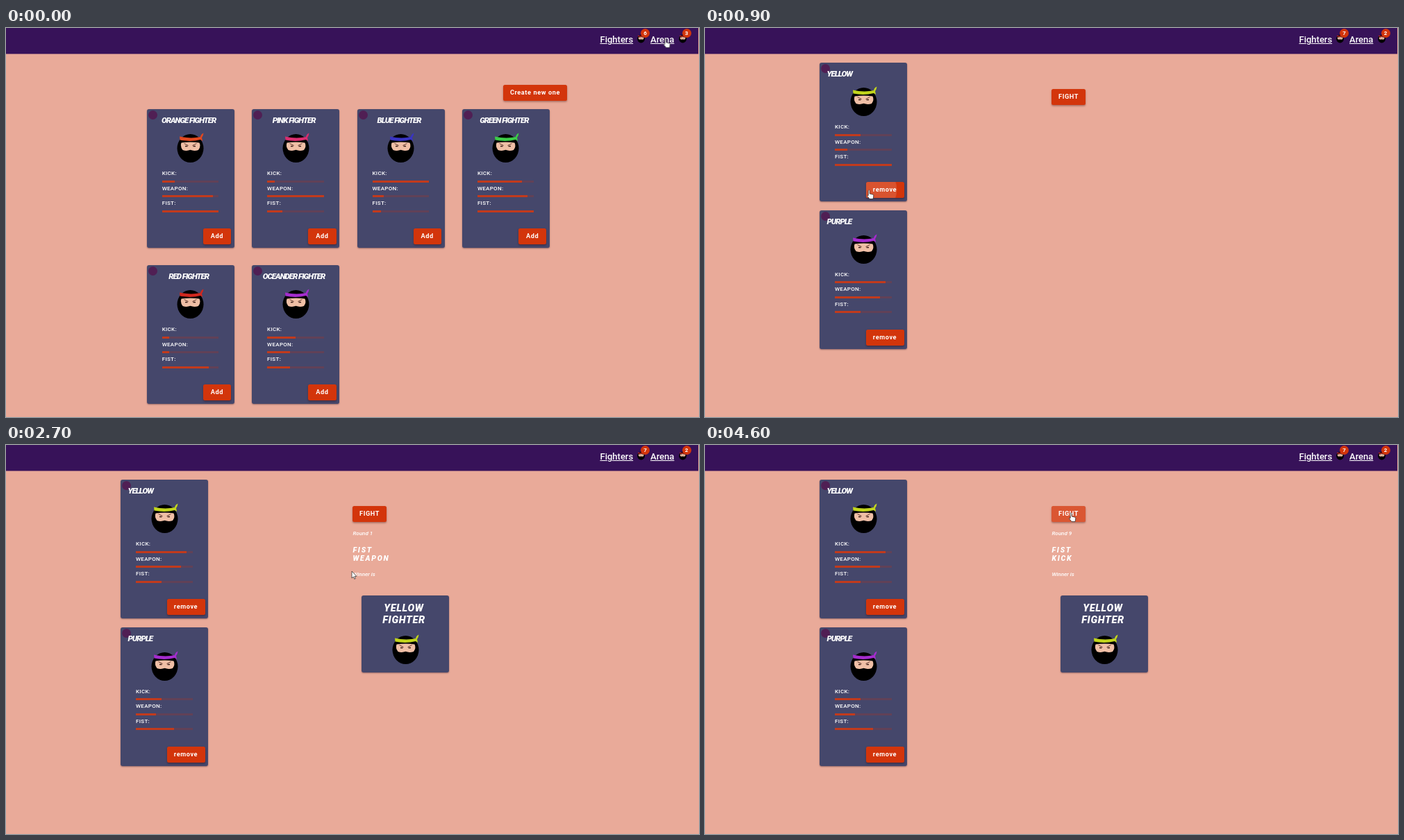
Write an HTML page that moves like this. It is 998 px wide and 561 px high and loops after 4700 ms.

```html
<!DOCTYPE html>
<html lang="en">
<head>
<meta charset="utf-8">
<title>Fighter arena</title>
<style>
html, body { margin: 0; width: 100%; height: 100%; overflow: hidden; background: #e9aa99; }
body { position: relative; font-family: Roboto, sans-serif; color: #fff; }
div, svg { position: absolute; white-space: nowrap; }
#stage { left: 0; top: 0; width: 998px; height: 561px; overflow: hidden; --loop: 4.7s infinite; }
.scene { inset: 0; }
.list { animation: list var(--loop) step-end; }
.trio { animation: trio var(--loop) step-end; }
.duel { animation: duel var(--loop) step-end; }

.top { left: 0; height: 37px; background: #371259; box-shadow: 0 1px 0 rgba(55, 18, 92, .4); }
.link { font: 500 13px/20px Roboto, sans-serif; top: 7px; text-decoration: underline; }
.badge { width: 13px; height: 13px; top: .5px; border-radius: 50%; background: #d3350b; font: 700 8px/13px Roboto, sans-serif; text-align: center; }

.card { width: 126px; height: 200px; border-radius: 3px; background: #45476b; box-shadow: 0 1px 2px rgba(40, 20, 40, .45); }
.dot { left: 2px; top: 2px; width: 13px; height: 13px; border-radius: 50%; background: #501f54; }
.title { top: 8px; left: 10.5px; font: italic 900 11.5px/16px Roboto, sans-serif; letter-spacing: -1px; }
.list .title { left: 0; width: 121px; text-align: center; }
.face { left: 43.6px; top: 33px; width: 42px; height: 46px; }
.label { left: 22px; font: 500 8px/12px Roboto, sans-serif; letter-spacing: .3px; }
.track { left: 22px; width: 81.5px; height: 3px; background: rgba(180, 50, 30, .25); }
.fill { height: 3px; background: #c23a1c; animation: grow var(--loop) ease; }
.btn { height: 23px; border-radius: 2.5px; background: #d3350b; box-shadow: 0 1.5px 2.5px rgba(60, 10, 10, .4); overflow: hidden; font: 700 9.2px/22.5px Roboto, sans-serif; letter-spacing: .58px; text-align: center; }
.glow { inset: 0; background: #fff; opacity: 0; animation: glow var(--loop) linear; }
.ripple { left: -30px; top: -26px; width: 74px; height: 74px; border-radius: 50%; background: #fff; opacity: 0; animation: ripple var(--loop) linear; }

.bar { right: 0; top: 0; width: 11px; height: 561px; background: #f1f1f1; }
.thumb { left: 2px; top: 8px; width: 7.5px; height: 506px; background: #c1c1c1; }
.arrow { left: 3.5px; border: solid transparent; border-width: 0 2.2px 2.5px; border-bottom-color: #777; }

.window { left: 490px; top: 115px; width: 160px; height: 230px; overflow: hidden; }
.reel { animation: reel var(--loop) step-end; }
.note { left: 9.5px; font: italic 500 8px/12px Roboto, sans-serif; }
.move { left: 9.5px; font: italic 900 10.5px/12px Roboto, sans-serif; letter-spacing: 1.75px; }
.winner { left: 22px; top: 102px; height: 111px; }
.winner .face { top: 55px; }
.name { left: 0; top: 10px; width: 122px; font: italic 900 14.5px/17px Roboto, sans-serif; letter-spacing: .65px; text-align: center; }

#cursor { left: 0; top: 0; animation: travel var(--loop) ease-in-out; }
#cursor svg { overflow: visible; width: 12px; height: 16px; }
.hand { left: -3px; top: 0; animation: hand var(--loop) step-end; }
.pointer { animation: pointer var(--loop) step-end; }

@keyframes list { 0% { visibility: visible } 2.1%, 100% { visibility: hidden } }
@keyframes trio { 0% { visibility: hidden } 2.1% { visibility: visible } 18.9%, 100% { visibility: hidden } }
@keyframes duel { 0% { visibility: hidden } 18.9%, 100% { visibility: visible } }
@keyframes grow { 0%, 19.2% { width: var(--from) } 24.5%, 100% { width: var(--to) } }
@keyframes ripple {
  0%, 17.5% { transform: scale(0); opacity: .15 }
  19.15% { transform: scale(1); opacity: .15 }
  21.3% { transform: scale(1.6); opacity: .14 }
  24.5%, 100% { transform: scale(1.6); opacity: 0 }
}
@keyframes glow {
  0%, 34% { opacity: 0 }
  35%, 43.8% { opacity: .04 }
  44.6%, 47% { opacity: .15 }
  50%, 65.5% { opacity: 0 }
  66.5% { opacity: .05 }
  68%, 100% { opacity: .16 }
}
@keyframes reel {
  0% { transform: none }
  44.4% { transform: translateY(-230px) }
  67.6% { transform: translateY(-460px) }
  71.9% { transform: translateY(-690px) }
  78.5% { transform: translateY(-920px) }
  82.7% { transform: translateY(-1150px) }
  87% { transform: translateY(-1380px) }
  91.2% { transform: translateY(-1610px) }
  93.4% { transform: translateY(-1840px) }
  95.5%, 100% { transform: translateY(-2070px) }
}
@keyframes travel {
  0% { transform: translate(950px, 14.5px); animation-timing-function: linear }
  4.25% { transform: translate(860px, 55px) }
  14.9% { transform: translate(240px, 236px) }
  19.1%, 24% { transform: translate(236px, 233px) }
  34.5%, 46.8% { transform: translate(514px, 95.5px) }
  53%, 61% { transform: translate(498px, 182px) }
  66.5%, 100% { transform: translate(527px, 97px) }
}
@keyframes hand {
  0% { visibility: visible } 2.1% { visibility: hidden }
  14% { visibility: visible } 25.5% { visibility: hidden }
  33.5% { visibility: visible } 48% { visibility: hidden }
  65.8%, 100% { visibility: visible }
}
@keyframes pointer {
  0% { visibility: hidden } 2.1% { visibility: visible }
  14% { visibility: hidden } 25.5% { visibility: visible }
  33.5% { visibility: hidden } 48% { visibility: visible }
  65.8%, 100% { visibility: hidden }
}
</style>
</head>
<body>
<svg width="0" height="0">
  <symbol id="ninja" viewBox="0 0 42 46">
    <ellipse cx="19.5" cy="23.5" rx="19" ry="20.5"/>
    <path d="M6.5 15.5Q19.5 13.5 32.500 15.500Q35 21 31 26Q25 28 19.500 25.800Q14 28 8.500 26Q4.500 21 6.500 15.500Z" fill="#f0bfa6"/>
    <path d="M10.500 16.500L16.500 19.500M28.500 16.500L22.500 19.500" stroke="#5a3026" stroke-width=".9"/>
    <path d="M12 20.500h3.500M23.500 20.500h3.500" stroke="#3a1d18" stroke-width="1.300"/>
    <path d="M4 6.500Q20 10 34 7Q34.500 3 38.500 1.500L37.500 5.500L36 8L37 13L34 11Q20 14.500 4.500 11.500Z" fill="currentColor"/>
  </symbol>
</svg>
<div id="stage"></div>
<script>
const band = {
  orange: '#e2481f', pink: '#d92d6f', blue: '#3934c2', green: '#3ccb48',
  red: '#d0281f', purple: '#a42cce', ocean: '#3092d2', yellow: '#c2d51c'
};
const stats = { ocean: [45, 22, 100], yellow: [90, 80, 45], purple: [45, 35, 68] };

const box = (cls, style = '', inner = '') => `<div class="${cls}" style="${style}">${inner}</div>`;
const at = (x, y) => `left:${x}px;top:${y}px;`;
const face = (color, style = '') =>
  `<svg class="face" style="color:${band[color]};${style}"><use href="#ninja"/></svg>`;
const button = (x, y, w, text, extra = '') => box('btn', at(x, y) + `width:${w}px`, text + extra);

function nav(width, shift, counts) {
  const item = (x, text, iconX, count) =>
    box('link', `left:${x}px`, text) +
    face('red', at(iconX, 8.5) + 'width:12px;height:13px') +
    box('badge', `left:${iconX + 5}px`, count);
  return box('top', `width:${width}px`) + box('', `left:${shift}px;top:0`,
    item(855.5, 'Fighters', 909, counts[0]) + item(928, 'Arena', 968.5, counts[1]));
}

function card(x, y, title, color, to, action, from = to, extra = '') {
  const rows = ['KICK:', 'WEAPON:', 'FIST:'].map((label, i) =>
    box('label', `top:${87 + i * 21.5}px`, label) +
    box('track', `top:${102.7 + i * 21.5}px`,
      box('fill', `--from:${from[i]}%;--to:${to[i]}%`))).join('');
  const w = action === 'Add' ? 40.5 : 55;
  return box('card', at(x, y),
    box('dot') + box('title', '', title) + face(color) + rows +
    button(121.5 - w, 172, w, action, extra));
}

const roster = [
  ['orange', [23, 90, 100]], ['pink', [13, 100, 27]], ['blue', [100, 20, 15]],
  ['green', [79, 88, 100]], ['red', [13, 13, 82]], ['purple', [50, 40, 40], 'oceander']
];
const list = roster.map(([color, values, name = color], i) =>
  card(202.7 + i % 4 * 151.4, 117 + (i > 3) * 225.2,
    name.toUpperCase() + ' FIGHTER', color, values, 'Add')).join('');

const slotY = i => 50.3 + i * 212.5;
const member = (x, i, name, from, extra) =>
  card(x, slotY(i), name.toUpperCase(), name, stats[name], 'remove', from && stats[from], extra);
const trio = ['ocean', 'yellow', 'purple'].map((name, i) => member(159, i, name)).join('');
const duel = member(165, 0, 'yellow', 'ocean', box('ripple')) + member(165, 1, 'purple', 'yellow');

const rounds = [
  ['FIST', 'WEAPON', 'yellow'], ['KICK', 'WEAPON', 'yellow'], ['WEAPON', 'WEAPON', 'yellow'],
  ['KICK', 'FIST', 'yellow'], ['WEAPON', 'KICK', 'purple'], ['KICK', 'FIST', 'purple'],
  ['WEAPON', 'FIST', 'yellow'], ['KICK', 'WEAPON', 'purple'], ['FIST', 'KICK', 'yellow']
];
const reel = rounds.map(([first, second, who], i) => box('', `left:0;top:${(i + 1) * 230}px`,
  box('note', 'top:7px', `Round ${i + 1}`) +
  box('move', 'top:30.5px', first) + box('move', 'top:42.5px', second) +
  box('note', 'top:65.5px', 'Winner is') +
  box('card winner', '', box('name', '', who.toUpperCase() + '<br>FIGHTER') + face(who)))).join('');

const scrollbar = box('bar', '', box('thumb') + box('arrow', 'top:2px') +
  box('arrow', 'top:556px;transform:scaleY(-1)'));

const cursor = `<div id="cursor">
  <svg class="hand"><path d="M2.2 1.5Q3.2 -.3 4.2 1.5V6L9 7.2Q10 7.6 9.8 9L9 13.5H4L.6 9.2Q.2 7.8 2.2 8.6Z" fill="#fff" stroke="#222" stroke-width=".7"/></svg>
  <svg class="pointer"><path d="M0 0V10L2.3 8L3.8 11.3L5.3 10.6L3.9 7.4H6.9Z" fill="#fff" stroke="#222" stroke-width=".7"/></svg>
</div>`;

document.getElementById('stage').innerHTML =
  box('scene list', '', nav(997, 0, [6, 3]) + button(715.7, 82, 92.5, 'Create new one') + list) +
  box('scene trio', '', nav(987, -11, [6, 3]) + button(493.5, 88, 49, 'FIGHT') + trio + scrollbar) +
  box('scene duel', '', nav(997, 0, [7, 2]) + button(499, 88, 49, 'FIGHT', box('glow')) + duel +
    box('window', '', box('reel', '', reel))) +
  cursor;
</script>
</body>
</html>
```
